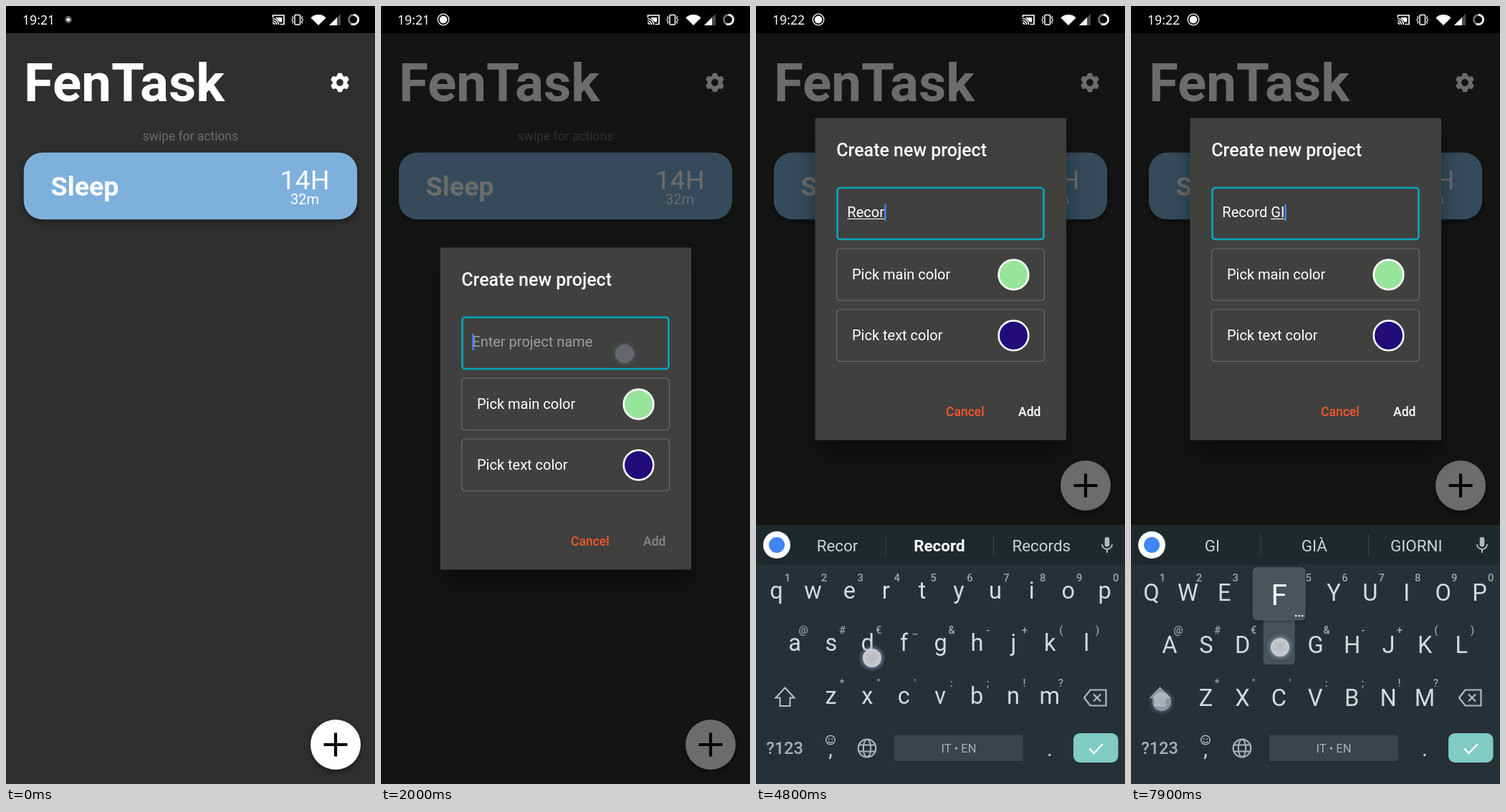
Animation of 515 by 1087 pixels, one loop 8000 ms. Source, as an HTML page with a canvas:

```html
<!DOCTYPE html>
<html lang="en">
<head>
<meta charset="utf-8">
<title>New project</title>
<style>
  html, body { margin: 0; width: 100%; height: 100%; overflow: hidden; background: #2e302d; }
  canvas { display: block; }
</style>
</head>
<body>
<canvas id="stage" width="515" height="1087"></canvas>
<script>
const ctx = document.getElementById('stage').getContext('2d');
const LOOP = 8000, STEP = 100, W = 515, H = 1087;
const PITCH = 50.9;
const ROWS = [
  { keys: 'qwertyuiop', hints: '1234567890', x: 28.5, y: 817 },
  { keys: 'asdfghjkl', hints: '@#€_&-+()', x: 54, y: 890 },
  { keys: 'zxcvbnm', hints: '*"\':;!?', x: 104.5, y: 964 }
];

// start, release, finger x, finger y, key, suggestions after release
const TAPS = [
  [900, 1000, 460, 1034],
  [1800, 1900, 340, 486],
  [2700, 2900, 194, 825, 'R'],
  [2800, 3000, 131, 812, 'e', 'Re|Regalo|Resto'],
  [3700, 3900, 209, 972, 'c', 'Rec|Recente|Record'],
  [4000, 4200, 438, 829, 'o', 'Reco|*Record|Records'],
  [4400, 4600, 188, 834, 'r', 'Recor|*Record|Records'],
  [4800, 4900, 162, 911, 'd', 'Records|Record|Recording'],
  [5400, 5600, 288, 1046, ' ', 'di|del|per'],
  [5700, 5900, 43, 971, 'shift'],
  [6000, 6200, 261, 898, 'G', 'G|Grazie|Gli'],
  [6300, 6500, 42, 970, 'shift'],
  [6500, 6700, 388, 828, 'I', 'GI|GIÀ|GIORNI'],
  [6700, 6900, 42, 970, 'shift'],
  [6900, 7100, 164, 874, 'D', 'GID|GIRO|GIF'],
  [7600, 7700, 476, 970, 'back', 'GI|GIÀ|GIORNI'],
  [7700, 7900, 43, 972, 'shift'],
  [7800, 8000, 208, 896, 'F']
];

const clamp = v => Math.max(0, Math.min(1, v));
const ramp = (t, from, to) => clamp((t - from) / (to - from));
const easeOut = p => 1 - (1 - p) ** 3;

function text(str, x, y, size, color, align = 'left', weight = 400, family = 'Roboto') {
  ctx.font = `${weight} ${size}px ${family}, sans-serif`;
  ctx.textAlign = align;
  ctx.fillStyle = color;
  ctx.fillText(str, x, y);
}

function paint(fill, stroke, width = 1) {
  if (fill) { ctx.fillStyle = fill; ctx.fill(); }
  if (stroke) { ctx.strokeStyle = stroke; ctx.lineWidth = width; ctx.stroke(); }
}

function box(x, y, w, h, r, fill, stroke, width) {
  ctx.beginPath();
  ctx.roundRect(x, y, w, h, r);
  paint(fill, stroke, width);
}

function circle(x, y, r, fill, stroke, width) {
  ctx.beginPath();
  ctx.arc(x, y, r, 0, Math.PI * 2);
  paint(fill, stroke, width);
}

function arc(x, y, r, from, to, stroke, width) {
  ctx.beginPath();
  ctx.arc(x, y, r, from * Math.PI, to * Math.PI);
  paint(null, stroke, width);
}

function poly(points, fill, stroke, width, open) {
  ctx.beginPath();
  points.forEach(([x, y]) => ctx.lineTo(x, y));
  if (!open) ctx.closePath();
  paint(fill, stroke, width);
}

const line = (x1, y1, x2, y2, color, width) => poly([[x1, y1], [x2, y2]], null, color, width, true);

function shadowed(alpha, blur, dy, draw) {
  ctx.save();
  ctx.shadowColor = `rgba(0,0,0,${alpha})`;
  ctx.shadowBlur = blur;
  ctx.shadowOffsetY = dy;
  draw();
  ctx.restore();
}

function gear(x, y, r, color) {
  ctx.save();
  ctx.translate(x, y);
  circle(0, 0, r * 0.57, null, color, r * 0.4);
  for (let i = 0; i < 6; i++) {
    poly([[-r * .34, -r * .68], [-r * .2, -r], [r * .2, -r], [r * .34, -r * .68]], color);
    ctx.rotate(Math.PI / 3);
  }
  ctx.restore();
}

// Everything typed so far, derived from the released keys
function typedState(t) {
  const s = { text: '', caps: true, words: null, changed: 2400 };
  for (const [, release, , , key, words] of TAPS) {
    if (!key || t < release) continue;
    if (key === 'shift') { s.caps = true; continue; }
    s.text = key === 'back' ? s.text.slice(0, -1) : s.text + key;
    s.caps = false;
    s.changed = release;
    if (words) s.words = words.split('|');
  }
  return s;
}

function drawHome(fabY) {
  ctx.fillStyle = '#2e302d';
  ctx.fillRect(0, 0, W, H);
  text('FenTask', 25, 133, 74.5, '#fff', 'left', 700);
  gear(466, 107, 13.2, '#fff');
  text('swipe for actions', 257.5, 188, 17.5, '#6c6d6b', 'center');
  shadowed(.45, 7, 3, () => box(24.8, 204.7, 465.4, 93.6, 26, '#7eb0dc'));
  text('Sleep', 62.6, 265, 37.6, '#fff', 'left', 700);
  text('14H', 417, 256, 37.6, '#fff', 'center');
  text('32m', 417, 277, 20, '#fff', 'center');
  shadowed(.4, 9, 4, () => circle(460, fabY, 35, '#fff'));
  line(443.5, fabY, 476.5, fabY, '#000', 4.2);
  line(460, fabY - 16.5, 460, fabY + 16.5, '#000', 4.2);
}

function drawField(t, s) {
  const focused = t >= 2000;
  if (focused) box(113.5, 435, 288, 72, 4, null, '#04a7bd', 2.6);
  else box(112.7, 434.2, 289.6, 73, 5, null, '#8b8c8a', 1.3);
  const left = 127.3, baseline = 476;
  if (s.text.length < 2) {
    text('Enter project name', left, baseline, 20, s.text ? '#656664' : '#9d9e9c');
  }
  const space = s.text.lastIndexOf(' ') + 1;
  text(s.text, left, baseline, 20.1, '#fff');
  const start = left + ctx.measureText(s.text.slice(0, space)).width;
  const end = left + ctx.measureText(s.text).width;
  if (end > start) line(start, 478.5, end, 478.5, '#fff', 1.2);
  const lit = (t - s.changed) % 1000 < 500;
  if (focused && lit) line(end + 1.2, 458, end + 1.2, 481, '#4285f4', 2.5);
}

function drawPick(label, y, color) {
  box(112.5, y, 290, 72.5, 5, null, '#6a6b69', 1.2);
  text(label, 134, y + 43, 20, '#fff');
  circle(359.5, y + 36.4, 20.8, color, '#fff', 2.6);
}

function drawDialog(t, s, lift) {
  const shown = ramp(t, 900, 1200);
  if (!shown) return;
  ctx.save();
  ctx.globalAlpha = shown;
  ctx.translate(257.5, 562 - lift);
  const scale = .9 + .1 * easeOut(shown);
  ctx.scale(scale, scale);
  ctx.translate(-257.5, -562);
  shadowed(.4, 30, 20, () => box(82.5, 337.5, 350.5, 450, 2, '#40413f'));
  text('Create new project', 112.3, 391, 25, '#fff', 'left', 500);
  drawField(t, s);
  drawPick('Pick main color', 520, '#97e59b');
  drawPick('Pick text color', 605, '#210c7a');
  text('Cancel', 265, 754, 17.5, '#f4562c', 'left', 500);
  const addColor = !s.text ? '#858684' : t < 3000 ? '#bcbdbb' : '#fff';
  text('Add', 366, 754, 17.5, addColor, 'left', 500);
  ctx.restore();
}

function drawToolbar() {
  const c = '#8f989b';
  box(88, 743, 19, 19, 3, null, c, 2);
  arc(97.5, 752, 5, .1, .9, c, 2);
  text('GIF', 173.5, 759, 18, c, 'center', 700);
  box(240.5, 743.5, 17.5, 19, 2, null, c, 2);
  box(245, 740.5, 8.5, 5.5, 2, c);
  [750, 754, 758].forEach((y, i) => line(244, y, i < 2 ? 254 : 251, y, c, 1.6));
  gear(325, 753.5, 11.5, c);
  line(370.5, 738, 370.5, 767, '#39444a', 1);
  [409, 417, 425].forEach(x => circle(x, 753, 2.5, '#a9b0b3'));
}

function drawWords(words) {
  words.forEach((word, i) => {
    const bold = word[0] === '*';
    text(bold ? word.slice(1) : word, 113.5 + 142.4 * i, 762, 22.4,
      bold ? '#fff' : '#ced3d5', 'center', bold ? 700 : 400);
  });
  [181, 331.5].forEach(x => line(x, 738, x, 768, '#39444a', 1));
}

function drawShift(on) {
  const c = on ? '#8f989b' : '#bcc2c5';
  poly([[40.5, 952.5], [53.5, 966.5], [47.5, 966.5], [47.5, 978], [33.5, 978], [33.5, 966.5], [27.5, 966.5]],
    on ? c : null, c, 2);
}

function drawBottomRow() {
  const c = '#a9b1b4';
  text('?123', 40, 1045, 23.6, c, 'center', 500);
  circle(104, 1025.5, 6.3, null, c, 1.6);
  circle(101.8, 1024, 1.1, c);
  circle(106.2, 1024, 1.1, c);
  arc(104, 1026, 3.4, .1, .9, c, 1.4);
  text(',', 104, 1048, 30, '#d0d5d7', 'center');
  circle(155, 1037, 12.3, null, c, 2.3);
  ctx.beginPath();
  ctx.ellipse(155, 1037, 5.2, 12.3, 0, 0, Math.PI * 2);
  paint(null, c, 2.1);
  [1032.5, 1041.5].forEach(y => line(144, y, 166, y, c, 2.1));
  box(193, 1018.5, 180, 36.5, 3, '#3a454b');
  text('IT • EN', 283, 1043, 16.5, c, 'center');
  text('.', 410, 1048, 30, '#d0d5d7', 'center');
  box(443, 1016, 62.5, 41, 9, '#80cbc4');
  poly([[465, 1037.5], [471.5, 1044], [484, 1031]], null, '#fff', 2.4, true);
}

function drawMicAndDelete() {
  const c = '#b4babd';
  box(486.7, 742, 6.6, 13.5, 3.3, c);
  arc(490, 752, 7, 0, 1, c, 1.9);
  line(490, 759, 490, 764, c, 2);
  poly([[458, 966.5], [466.5, 955.5], [488.5, 955.5], [488.5, 977.5], [466.5, 977.5]], null, c, 2.2);
  line(471, 961.5, 481, 971.5, c, 2.2);
  line(481, 961.5, 471, 971.5, c, 2.2);
}

function drawPopup(key) {
  const row = ROWS.find(r => r.keys.includes(key.toLowerCase()));
  const x = row.x + row.keys.indexOf(key.toLowerCase()) * PITCH;
  const top = row.y - 106;
  box(x - 22, top + 66, 44, 70, 5, '#485359');
  shadowed(.25, 5, 2, () => box(x - 37, top, 74, 74.5, 6, '#4a555b'));
  text(key, x, top + 53, 40.5, '#fff', 'center');
  [23.5, 28, 32.5].forEach(dx => circle(x + dx, top + 68, 1.3, '#fff'));
}

function drawKeyboard(t, s, offset) {
  if (offset >= 362) return;
  ctx.save();
  ctx.translate(0, offset);
  ctx.fillStyle = '#263137';
  ctx.fillRect(0, 725, W, 362);
  ctx.fillStyle = '#1f292c';
  ctx.fillRect(0, 725, W, 55.5);
  circle(29, 753, 19, '#fff');
  circle(29, 753, 11, '#4285f4');
  if (s.words) drawWords(s.words); else drawToolbar();
  for (const row of ROWS) {
    [...row.keys].forEach((key, i) => {
      const x = row.x + i * PITCH;
      text(s.caps ? key.toUpperCase() : key, x, row.y + (s.caps ? 13.5 : 11), 32.6, '#d5dadc', 'center');
      text(row.hints[i], x + (row.hints[i] === '@' ? 12 : 15.5), row.y - 13, 14.8, '#9ea7ab', 'center', 500);
    });
  }
  drawShift(s.caps);
  drawMicAndDelete();
  drawBottomRow();
  for (const [start, release, , , key] of TAPS) {
    const letter = key && /^[a-z]$/i.test(key);
    if (letter && t >= start + STEP && t < release) drawPopup(key);
  }
  ctx.restore();
}

function drawTouches(t) {
  for (const [start, release, x, y] of TAPS) {
    if (t < start || t >= release + 2 * STEP) continue;
    ctx.save();
    ctx.globalAlpha = t < release ? .9 : t < release + STEP ? .5 : .2;
    const glow = ctx.createRadialGradient(x, y, 11, x, y, 19);
    glow.addColorStop(0, 'rgba(150,165,205,.75)');
    glow.addColorStop(1, 'rgba(130,145,185,0)');
    circle(x, y, 19, glow);
    const core = ctx.createRadialGradient(x, y, 2, x, y, 13);
    core.addColorStop(0, '#bfc1c2');
    core.addColorStop(1, '#d2d4d8');
    circle(x, y, 13, core);
    ctx.restore();
  }
}

function drawStatus(t) {
  const c = '#fff';
  ctx.fillStyle = '#000';
  ctx.fillRect(0, 0, W, 38);
  text(t < 2800 ? '19:21' : '19:22', 23, 26, 17.7, c, 'left', 400, '"Noto Sans"');
  const grow = ramp(t, 0, 300);
  circle(87, 19, 4 + 3.8 * grow, null, grow ? c : '#888', 1.3);
  circle(87, 19, 2.6 + 2.7 * grow, c);

  poly([[372.5, 16], [372.5, 13], [388, 13], [388, 25.5], [382.5, 25.5]], null, c, 1.7, true);
  [3.5, 6.5, 9.5].forEach(r => arc(372, 26, r - 1, 1.5, 2, c, 1.6));
  poly([[376, 16], [385, 16], [385, 22.5], [382, 22.5]], c);

  box(403, 12.5, 7.5, 13.5, 1.2, null, c, 1.5);
  [-1, 1].forEach(d => poly([[406.7 + d * 7, 14], [406.7 + d * 5.8, 16.5], [406.7 + d * 7.8, 19.5],
    [406.7 + d * 5.8, 22], [406.7 + d * 7, 24.5]], null, c, 1.2, true));

  ctx.beginPath();
  ctx.moveTo(436, 27);
  ctx.arc(436, 27, 15, -.75 * Math.PI, -.25 * Math.PI);
  paint(c);
  poly([[451, 27], [467, 27], [467, 11]], '#4a4a4a');
  poly([[451, 27], [462, 27], [462, 16]], c);
  circle(485, 19, 6.6, null, '#777', 2.6);
  arc(485, 19, 6.6, -.5, .65, c, 2.8);
}

function render(t) {
  const s = typedState(t);
  const slide = easeOut(ramp(t, 2000, 2400));
  const lift = 181 * easeOut(ramp(t, 2100, 2500));
  drawHome(t < 2400 ? 1032 : 670);
  ctx.fillStyle = `rgba(0,2,0,${.58 * ramp(t, 900, 1200)})`;
  ctx.fillRect(0, 0, W, H);
  drawDialog(t, s, lift);
  drawKeyboard(t, s, 362 * (1 - slide));
  drawTouches(t);
  drawStatus(t);
}

const startTime = performance.now();
function tick() {
  const t = (performance.now() - startTime) % LOOP;
  render(Math.floor(t / STEP) * STEP);
  requestAnimationFrame(tick);
}
tick();
</script>
</body>
</html>
```
